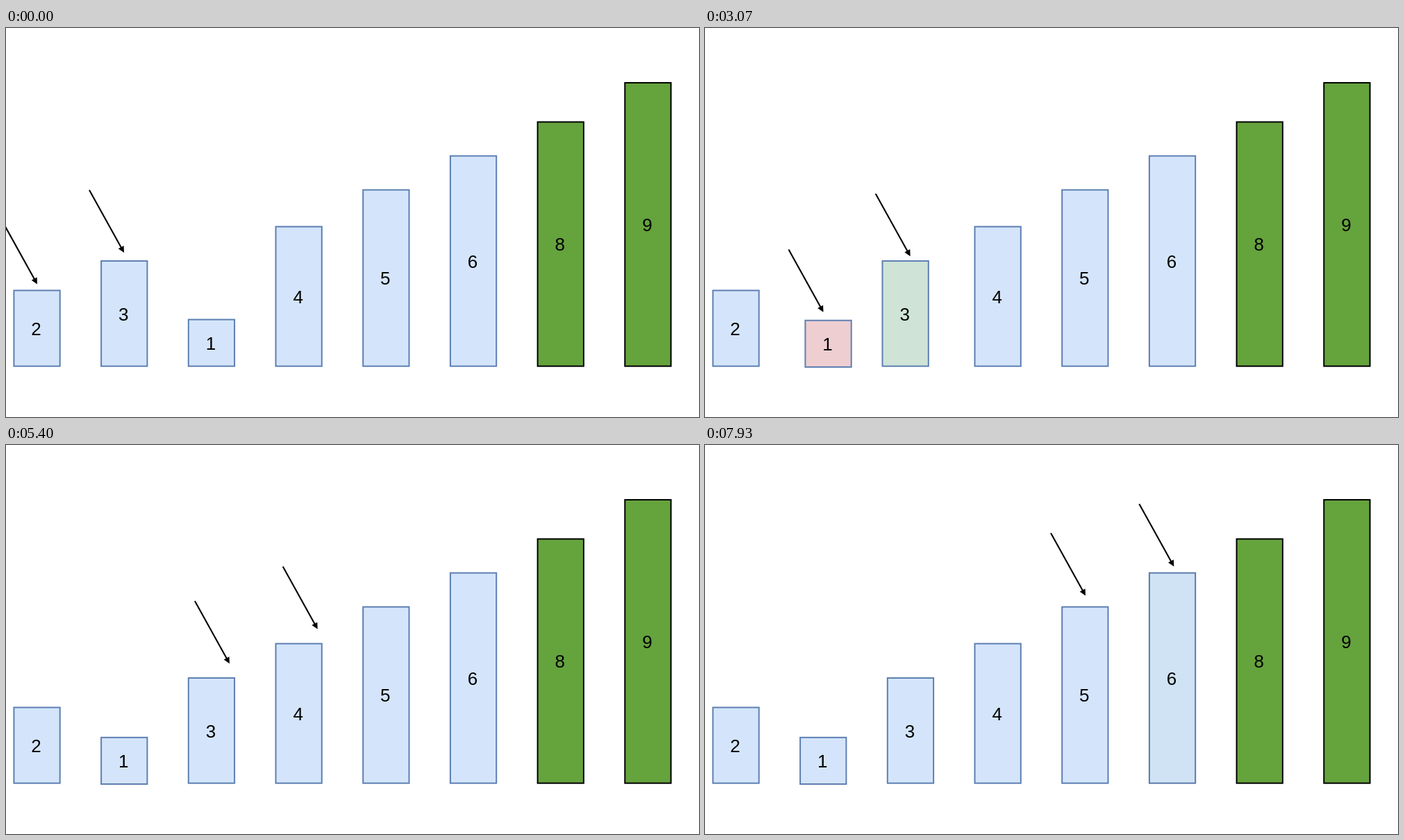
An HTML page with a canvas that plays this animation: 998x561 px, repeating every 8 s.

```html
<!DOCTYPE html>
<html lang="en">
<head>
<meta charset="utf-8">
<title>Bubble sort</title>
<style>
  html, body { margin: 0; width: 100%; height: 100%; overflow: hidden; background: #fff; }
  canvas { display: block; }
</style>
</head>
<body>
<canvas id="stage" width="998" height="561"></canvas>
<script>
const ctx = document.getElementById('stage').getContext('2d');

const LOOP = 8000, FPS = 15, START = 380, STEP = 1500;
const BLUE = [212, 229, 251], BLUE_EDGE = [93, 127, 178];
const RED = [246, 200, 198], MINT = [206, 228, 206];
const GREEN = [101, 163, 61], BLACK = [0, 0, 0];

// Bars in drawing order: label and top edge
const BARS = [[2, 378.5], [3, 336], [1, 420.5], [4, 286.5], [5, 233.5], [6, 184.5], [8, 135.5], [9, 79]];
const FIRST_X = 11.4, GAP = 125.7, BAR_WIDTH = 66.3, FLOOR = 487.7;

// Tips of the left and right arrow at the start of each step
const TIPS = [
  [45, 369.5, 170, 324],
  [170, 324, 295.3, 413],
  [170.5, 415, 295.7, 324],
  [295.5, 325, 423, 278],
  [423, 278, 547, 218],
  [548, 217.3, 675.3, 175.3]
];

const lerp = (a, b, p) => a + (b - a) * p;
const mix = (a, b, p) => a.map((v, i) => lerp(v, b[i], p));
const rgb = c => `rgb(${c.map(Math.round)})`;

// Smooth start and stop, with very slow ends
function ease(u) {
  const warped = u - 0.0557 * Math.sin(2 * Math.PI * u);
  return (1 - Math.cos(Math.PI * warped)) / 2;
}

function drawBar(label, slot, top, bottom, fill, edge) {
  const x = FIRST_X + GAP * slot;
  ctx.fillStyle = rgb(fill);
  ctx.strokeStyle = rgb(edge);
  ctx.lineWidth = 2;
  ctx.fillRect(x, top, BAR_WIDTH, bottom - top);
  ctx.strokeRect(x, top, BAR_WIDTH, bottom - top);
  ctx.fillStyle = '#000';
  ctx.fillText(label, x + BAR_WIDTH / 2 - 1, (top + bottom) / 2 + 9.8);
}

function drawArrow(x, y) {
  ctx.save();
  ctx.translate(x, y);
  ctx.rotate(Math.atan2(90.3, 50));
  ctx.strokeStyle = ctx.fillStyle = '#000';
  ctx.lineWidth = 2.1;
  ctx.beginPath();
  ctx.moveTo(-103.2, 0);
  ctx.lineTo(-6, 0);
  ctx.stroke();
  ctx.beginPath();
  ctx.moveTo(0, 0);
  ctx.lineTo(-9, -4.5);
  ctx.lineTo(-9, 4.5);
  ctx.fill();
  ctx.restore();
}

function draw(ms) {
  const time = Math.floor((ms % LOOP + 4) * FPS / 1000) * 1000 / FPS;
  const elapsed = Math.max(0, time - START);
  const step = Math.floor(elapsed / STEP);
  const fade = elapsed / STEP - step;
  const moved = ease(fade);

  const swap = step === 1 ? moved : +(step > 1);
  const tint = step === 1 ? fade : step === 2 ? 1 - fade : 0;
  const sorted = step === 5 ? fade : 0;

  ctx.fillStyle = '#fff';
  ctx.fillRect(0, 0, 998, 561);
  ctx.font = '26px "Liberation Sans", Arial, sans-serif';
  ctx.textAlign = 'center';

  BARS.forEach(([label, top], i) => {
    let slot = i, drop = 0, fill = BLUE, edge = BLUE_EDGE;
    if (label === 3) {
      slot += swap;
      fill = mix(BLUE, MINT, tint);
    } else if (label === 1) {
      slot -= swap;
      drop = 1.3 * swap;
      fill = mix(BLUE, RED, tint);
    } else if (label === 6) {
      fill = mix(BLUE, GREEN, sorted);
      edge = mix(BLUE_EDGE, BLACK, sorted);
    } else if (label > 6) {
      fill = GREEN;
      edge = BLACK;
    }
    drawBar(label, slot, top + drop, FLOOR + drop, fill, edge);
  });

  const [lx, ly, rx, ry] = mix(TIPS[step], TIPS[Math.min(step + 1, TIPS.length - 1)], moved);
  drawArrow(lx, ly);
  drawArrow(rx, ry);
}

function tick() {
  draw(performance.now());
  requestAnimationFrame(tick);
}
tick();
</script>
</body>
</html>
```
